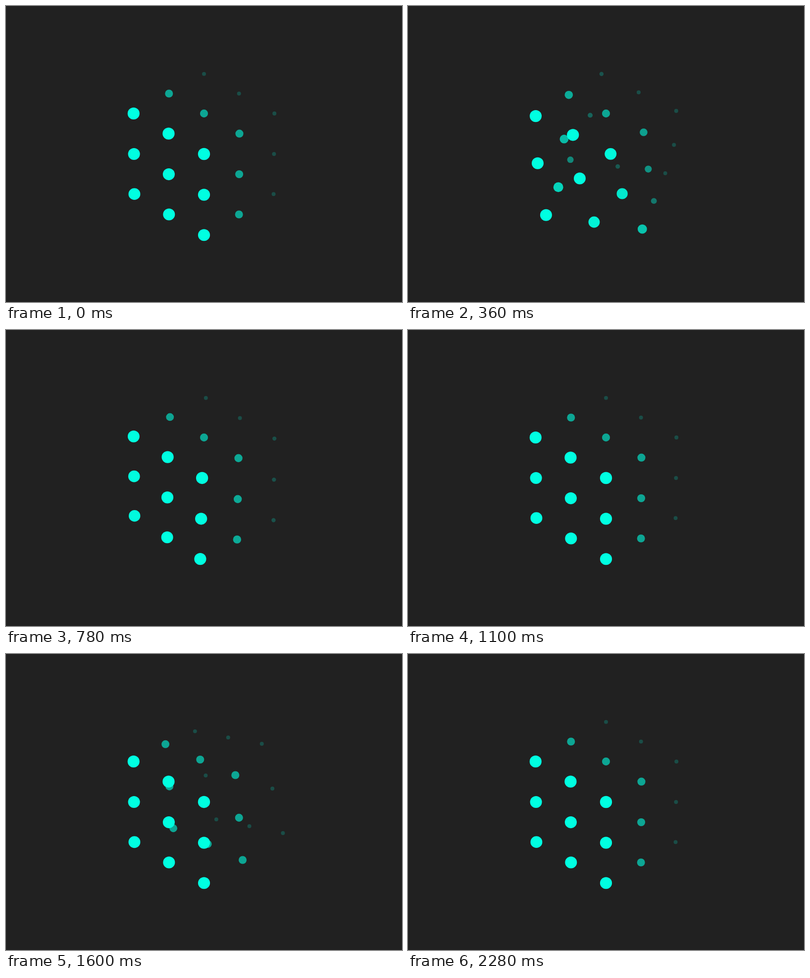
Recreate the animation shown at these times as an HTML page with a canvas. Size 800 px wide and 600 px high, loop 2.4 s.

```html
<!DOCTYPE html>
<html lang="en">
<head>
<meta charset="utf-8">
<title>Dot cube</title>
<style>
  html, body { margin: 0; width: 100%; height: 100%; overflow: hidden; background: #212121; }
  canvas { display: block; }
</style>
</head>
<body>
<canvas id="stage" width="800" height="600"></canvas>
<script>
const ctx = document.getElementById('stage').getContext('2d');

const TURN = 1200;        // one turn including the pause
const STAGGER = 60;       // delay between neighbouring layers
const RISE = 524, LAYER = 980;
const OVERSHOOT = 3.85;   // degrees past the quarter turn
const CAMERA = 10000;
const BACK = [33, 33, 33], DOT = [0, 255, 225];

// Isometric view of a cube grid with a spacing of 100
const SX = 100 * Math.SQRT1_2;
const SY = 100 / Math.sqrt(6);
const SZ = 100 / Math.sqrt(3);

const clamp = (v, lo, hi) => Math.min(hi, Math.max(lo, v));

// cubic-bezier(x1, 0, x2, 1)
function bezier(x1, x2, x) {
  let lo = 0, hi = 1, u = 0.5;
  for (let n = 0; n < 24; n++) {
    u = (lo + hi) / 2;
    const at = 3 * (1 - u) * u * ((1 - u) * x1 + u * x2) + u ** 3;
    if (at < x) lo = u; else hi = u;
  }
  return u * u * (3 - 2 * u);
}

// Layer angle in degrees: swing past 90, then settle back
function angle(t) {
  if (t <= 0) return 0;
  if (t >= LAYER) return 90;
  if (t < RISE) return (90 + OVERSHOOT) * bezier(0.512, 0.245, t / RISE);
  const p = (t - RISE) / (LAYER - RISE);
  return 90 + OVERSHOOT * (1 + Math.cos(Math.PI * p)) / 2;
}

function rotate(a, b, deg) {
  const r = deg * Math.PI / 180, c = Math.cos(r), s = Math.sin(r);
  return [a * c - b * s, a * s + b * c];
}

// u runs to the right, v down, w to the front left
const grid = [];
for (const u of [-1, 0, 1])
  for (const v of [-1, 0, 1])
    for (const w of [-1, 0, 1]) grid.push([u, v, w]);

const without = (...gone) => grid.filter(p => !gone.includes(p.join()));

const turns = [
  {
    dots: without('0,0,0', '-1,0,0', '0,1,0'),
    layer: ([u, v, w]) => v + 1,
    spin([u, v, w], deg) {
      const [a, b] = rotate(u, w, deg);
      return [a, v, b];
    }
  },
  {
    dots: without('0,0,0', '0,0,-1'),
    layer: ([u, v, w]) => 1 - w,
    spin([u, v, w], deg) {
      const [a, b] = rotate(u, v, deg);
      return [a, b, w];
    }
  }
];

// Places covered by a nearer dot when the cube is at rest
const covered = ([u, v, w]) => u < 0.5 && v > -0.5 && w < 0.5;

function project([u, v, w]) {
  const z = SZ * (u + w - v);
  const k = CAMERA / (CAMERA - z);
  const depth = clamp(w, -1, 1);
  return {
    x: 400 + SX * (u - w) * k,
    y: 300 + SY * (u + w + 2 * v) * k,
    z,
    r: (8 + 4 * depth) * k,
    mix: 0.6 + 0.4 * depth
  };
}

// Dots that land in a covered place go out on arrival
function place(turn, t) {
  const shown = [];
  for (const p of turn.dots) {
    const deg = angle(t - STAGGER * turn.layer(p));
    if (deg >= 90 && covered(turn.spin(p, 90))) continue;
    shown.push(project(turn.spin(p, deg)));
  }
  return shown.sort((a, b) => a.z - b.z);
}

function draw(time) {
  const t = time % (2 * TURN);
  ctx.fillStyle = `rgb(${BACK})`;
  ctx.fillRect(0, 0, 800, 600);
  for (const { x, y, r, mix } of place(turns[Math.floor(t / TURN)], t % TURN)) {
    ctx.fillStyle = `rgb(${BACK.map((c, n) => Math.round(c + (DOT[n] - c) * mix))})`;
    ctx.beginPath();
    ctx.arc(x, y, r, 0, 2 * Math.PI);
    ctx.fill();
  }
}

const start = performance.now();
function tick() {
  draw(performance.now() - start);
  requestAnimationFrame(tick);
}
tick();
</script>
</body>
</html>
```
